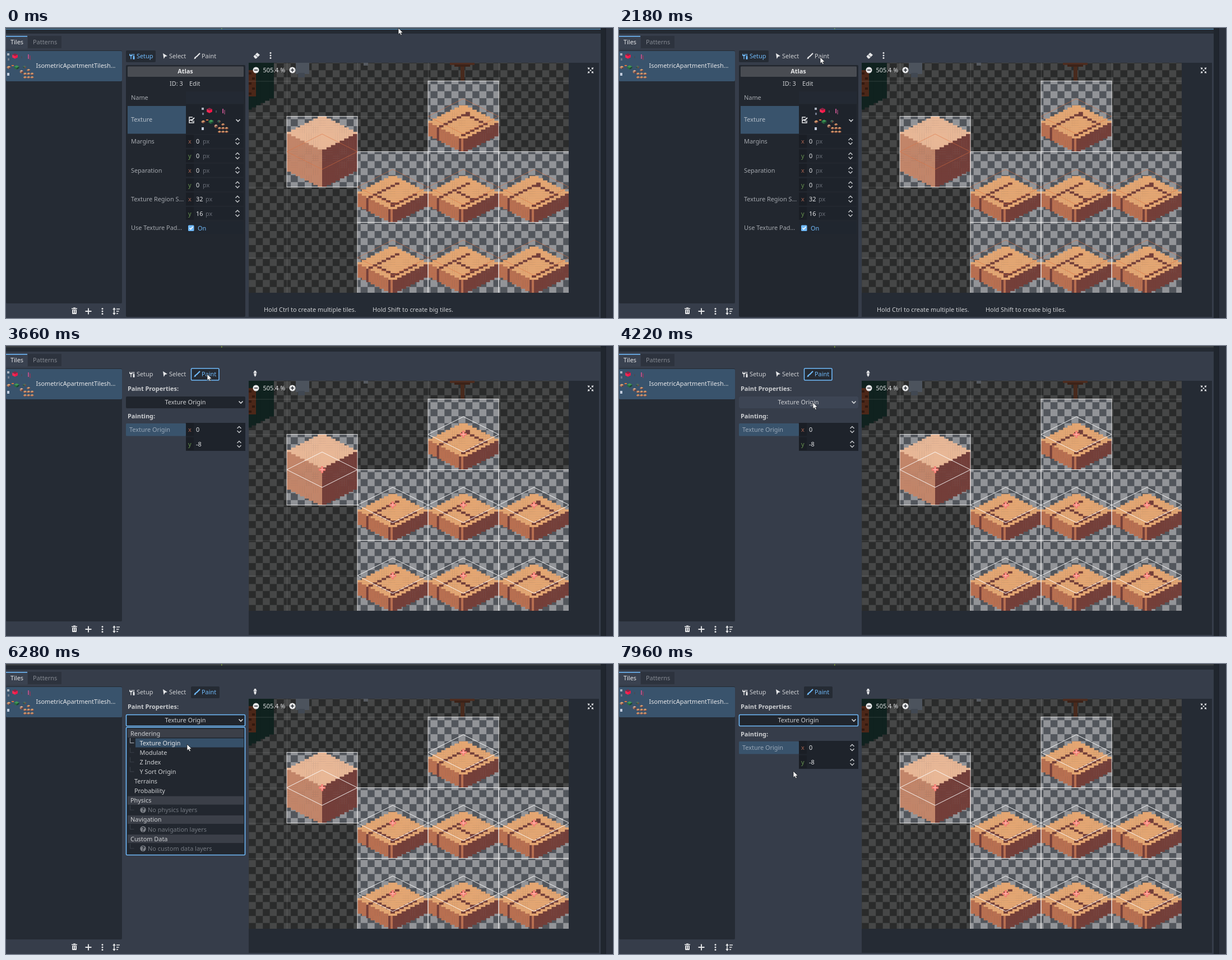
Animation of 1083 by 517 pixels, one loop 8 s. Source, as an HTML page with a canvas:

```html
<!DOCTYPE html>
<html lang="en">
<head>
<meta charset="utf-8">
<title>Tile set editor</title>
<style>
html, body { margin: 0; width: 100%; height: 100%; overflow: hidden; background: #363d4a; }
canvas, svg { position: absolute; left: 0; top: 0; }
svg text { font: 10.9px "Noto Sans", sans-serif; white-space: pre; }
svg .b { font-weight: 700; }
</style>
</head>
<body>
<canvas id="atlas" width="1083" height="517"></canvas>
<svg id="ui" width="1083" height="517" viewBox="0 0 1083 517"></svg>
<script>
const LOOP = 8000;
const BASE = '#363d4a', DARK = '#252b34', DEEP = '#1e232b', BLUE = '#70bafa', SEL = '#39536c';
const TEXT = '#cdcfd2', WHITE = '#e6e7e9';

// ---- atlas view (canvas) ----
const ctx = document.getElementById('atlas').getContext('2d');
const VIEW = { x: 433, y: 62, w: 571, h: 410 };
const TILE = 126, PX = TILE / 32, X0 = 501, Y0 = 94.5;
const CELL = TILE * 16 / 161.73;
const ORIGIN = { x: X0 - 4 * TILE, y: Y0 - 5 * TILE };
const BOX = { x: X0, y: 157.5 };
const CRATES = [[2, 0, 3], [1, 1, 12], [2, 1, 8], [3, 1, 3], [1, 2, 12], [2, 2, 8], [3, 2, 3]]
  .map(([c, r, seam]) => ({ x: X0 + c * TILE, y: Y0 + r * TILE, seam }));
const TILES = [BOX, ...CRATES];

function fill(x, y, w, h, color) {
  ctx.fillStyle = color;
  ctx.fillRect(x, y, w, h);
}

function checker(x, y, w, h, dark, light) {
  ctx.save();
  ctx.beginPath();
  ctx.rect(x, y, w, h);
  ctx.clip();
  fill(x, y, w, h, dark);
  const i0 = Math.floor((x - ORIGIN.x) / CELL), j0 = Math.floor((y - ORIGIN.y) / CELL);
  for (let j = j0; ORIGIN.y + j * CELL < y + h; j++)
    for (let i = i0; ORIGIN.x + i * CELL < x + w; i++)
      if ((i + j) % 2 === 0) fill(ORIGIN.x + i * CELL, ORIGIN.y + j * CELL, CELL, CELL, light);
  ctx.restore();
}

// Isometric block made of texels: a rhombus top plus two sides.
function block(o, top, thick, colors, shade) {
  for (let c = 0; c < 32; c++) {
    const k = Math.floor((c < 16 ? c : 31 - c) / 2);
    for (let r = top - k - 1; r < top + k + thick + 1; r++) {
      const face = r < top + k ? 0 : c < 16 ? 1 : 2;
      const color = shade && shade(c, r, face) || colors[face];
      fill(o.x + c * PX, o.y + r * PX, PX + .3, PX + .3, color);
    }
  }
}

function crate(o) {
  const seamColor = '#743f39';
  block(o, 19, 5, ['#e4a672', '#b86f50', seamColor], (c, r, face) => {
    if (face === 1) return (c === 4 || c === 14) && seamColor;
    if (face === 2) return false;
    const x = (c - 15.5) / 2, y = r - 10.75;
    const u = Math.floor(y + x), v = Math.floor(y - x);
    const plank = (u === 4 || u === 13) && v > 1 && v < 15;
    const cross = v === o.seam && u > 4 && u < 13;
    return (plank || cross) && seamColor;
  });
}

function dimArt() {
  for (let i = 0; i < 11; i++)
    fill(433, 62, 45 - Math.max(0, i - 5) * 7.9, 44 + i * 3.95, '#10221f');
  fill(433, 75, 13, 47, '#4c2718');
  for (let i = 0; i < 5; i++) fill(433 + i % 2 * 6, 79 + i * 9, 5, 4, '#32190f');
  fill(517, 62, 24, 20, '#4c535d');
  fill(521, 80, 12, 8, '#414852');
  fill(638, 62, 8, 5, '#565a60');
  fill(792, 62, 44, 4, '#4d2d20');
  fill(800, 65, 28, 4, '#3c2218');
  fill(811, 69, 7, 26, '#482a1d');
}

function drawAtlas(painting) {
  ctx.clearRect(0, 0, 1083, 517);
  fill(433, 62, 625, 453, DARK);
  ctx.save();
  ctx.beginPath();
  ctx.rect(VIEW.x, VIEW.y, VIEW.w, VIEW.h);
  ctx.clip();
  checker(VIEW.x, VIEW.y, VIEW.w, VIEW.h, '#2a2b2b', '#464747');
  dimArt();
  for (let i = 0; i < 4; i++) fill(X0 + i * TILE, VIEW.y, 1, VIEW.h, 'rgba(255,255,255,.13)');
  for (let i = 0; i < 6; i++) fill(VIEW.x, Y0 + i * TILE / 2, VIEW.w, 1, 'rgba(255,255,255,.13)');
  for (const t of TILES) checker(t.x, t.y, TILE, TILE, '#52565c', '#929498');
  block(BOX, 8, 16, ['#e8b796', '#c28569', '#733e39']);
  CRATES.forEach(crate);
  ctx.strokeStyle = 'rgba(245,245,245,.85)';
  for (const t of TILES) ctx.strokeRect(t.x, t.y, TILE, TILE);
  for (const t of TILES) {
    const x = t.x + 63, y = t.y + 63;
    ctx.strokeStyle = painting ? 'rgba(255,255,255,.9)' : 'rgba(222,112,62,.55)';
    ctx.beginPath();
    [[0, -31.5], [63, 0], [0, 31.5], [-63, 0]].forEach(([dx, dy]) => ctx.lineTo(x + dx, y + dy));
    ctx.closePath();
    ctx.stroke();
    if (painting) {
      fill(x - 6, y - 2, 12, 4, '#f47a70');
      fill(x - 2, y - 6, 4, 12, '#f47a70');
      fill(x - 4, y - .5, 8, 1, '#ffc2b8');
      fill(x - .5, y - 4, 1, 8, '#ffc2b8');
    }
  }
  ctx.restore();
}

// ---- interface (SVG) ----
const rect = (x, y, w, h, color, more = '') =>
  `<rect x="${x}" y="${y}" width="${w}" height="${h}" fill="${color}" ${more}/>`;
// y is the middle of the line
const text = (x, y, s, color = TEXT, more = '') =>
  `<text x="${x}" y="${y + 4}" fill="${color}" ${more}>${s}</text>`;
const line = (d, color = WHITE, w = 1.5) =>
  `<path d="${d}" fill="none" stroke="${color}" stroke-width="${w}"/>`;
const shape = (d, color = WHITE) => `<path d="${d}" fill="${color}"/>`;
const dot = (x, y, r, color = WHITE) => `<circle cx="${x}" cy="${y}" r="${r}" fill="${color}"/>`;
const group = (id, ...parts) => `<g id="${id}">${parts.join('')}</g>`;
const ring = (x, y, w, h) => rect(x, y, w, h, 'none', `stroke="${BLUE}" stroke-width="1.6" rx="1.5"`);
const middle = 'text-anchor="middle"', bold = 'class="b"';
const dots = (x, y) => [-4.5, 0, 4.5].map(d => dot(x, y + d, 1.5)).join('');
const spin = (x, y) => line(`M${x - 3.5} ${y - 2}l3.5 -3.5l3.5 3.5M${x - 3.5} ${y + 2}l3.5 3.5l3.5 -3.5`, '#c4c7cb', 1.5);
const chevron = (x, y) => line(`M${x - 3.5} ${y - 2}l3.5 3.5l3.5 -3.5`, '#d5d7da', 1.7);

function thumb(x, y) {
  const hex = (cx, cy, s, h, a, b, c) =>
    shape(`M${cx} ${cy - s}l${s} ${s / 2}l${-s} ${s / 2}l${-s} ${-s / 2}z`, a) +
    shape(`M${cx - s} ${cy - s / 2}l${s} ${s / 2}v${h}l${-s} ${-s / 2}z`, b) +
    shape(`M${cx + s} ${cy - s / 2}l${-s} ${s / 2}v${h}l${s} ${-s / 2}z`, c);
  let s = hex(16, 8, 4.8, 4.8, '#8b2444', '#f02a55', '#ff1648');
  for (let i = 0; i < 3; i++) for (let j = 0; j < 2; j++)
    s += hex(34 + i * 6.3, 40.500 + j * 6.4, 3, 1.4, '#e4a672', '#b86f50', '#9a523f');
  s += hex(40.300, 34, 3, 1.4, '#e4a672', '#b86f50', '#743f39');
  s += hex(27.700, 36, 3, 3, '#e8b796', '#b07b62', '#733e39');
  s += hex(5, 29, 3.500, 2, '#e4a672', '#b07b62', '#733e39');
  s += hex(19, 29, 4.500, 3, '#3f9a55', '#2a6b40', '#1d4a33');
  s += hex(33, 28, 3, 2, '#507060', '#2b5548', '#7a4a3c');
  s += rect(2, 3, 4, 4, '#a9b0bb') + rect(3, 12, 3, 4, '#70798a') + rect(2, 38, 4, 5, '#c0cbdc');
  s += rect(39, 5, 2, 8, '#b55088') + rect(42, 7, 2, 8, '#76405f') + rect(27, 8, 2, 4, '#444b57');
  s += rect(10, 24, 4, 2, '#d77643');
  return `<g transform="translate(${x} ${y})">${s}</g>`;
}

// Four arrows pointing at a centre dot.
const recenter = (x, y) => dot(x, y, 1.3) + [0, 90, 180, 270].map(a =>
  `<g transform="translate(${x} ${y}) rotate(${a})">${line('M5 5L2.800 2.800M2.500 5V2.500H5', WHITE, 1.2)}</g>`).join('');
const wrench = c => line('M221 46v3M225 46v3M223 49.5v6M228 46v5', c, 1.4) + rect(226.5, 50, 3, 6, c, 'rx="1"') + rect(220.5, 48, 5, 2, c);
const brush = c => line('M346 45l-6.5 6.5', c, 2.2) + shape('M340 51l-1.5 3.5l-3.2 1q1 -4 3.2 -5z', c);
const field = (y, axis, value) =>
  rect(321, y - 11.5, 103, 23, DEEP) + rect(321, y - 11.5, 14, 23, '#1a1e25') +
  text(325, y, axis, axis === 'x' ? '#a3614f' : '#66934f') + text(339, y, value, WHITE);
const sized = (y, axis, value) =>
  field(y, axis, value) + text(value.length > 1 ? 356 : 351, y, 'px', '#686d76') + spin(413, y);

const frame = [
  rect(0, 0, 1061, 10, '#242a33'), rect(0, 0, 1061, 2.5, '#3c4043'), rect(384, 0, 1.5, 3, '#6f8f35'),
  rect(1061, 0, 8, 517, '#20262e'), rect(1069, 0, 14, 517, '#2b313c'), rect(1069, 0, 1.5, 517, '#1c2129'),
  rect(0, 14, 38, 23, '#3a4250'), rect(0, 14, 38, 1.6, BLUE), rect(39, 14, 60, 22, '#2d333e'),
  text(8, 25, 'Tiles', WHITE), text(48, 25, 'Patterns', '#868b93'),
  rect(0, 40, 207, 451, DARK, 'rx="2"'), rect(0, 41, 207, 54, SEL, 'rx="2"'),
  thumb(0, 42), text(53.5, 67, 'IsometricApartmentTilesh...', WHITE),
  rect(118, 502, 8, 8, WHITE, 'rx="1"'), rect(117, 499.5, 10, 1.6, WHITE), rect(120, 498.3, 4, 1.5, WHITE),
  line('M120.5 503v5M123.5 503v5', BASE, 1),
  line('M147 499.5v11M141.5 505h11', WHITE, 1.9), dots(172, 505),
  line('M193 500v10M191 502l2 -2.5l2 2.5M191 508l2 2.5l2 -2.5M197 501h6M197 505h4.5M197 509h3'),
  shape('M280 45l8 5l-4 1l-2.5 4z'), text(291, 50, 'Select'),
  dot(446, 75, 5.5), line('M443 75h6', '#30343a', 1.6),
  dot(511, 75, 5.5), line('M508 75h6M511 72v6', '#30343a', 1.6),
  text(458.5, 75, '505.4 %', WHITE), recenter(1043, 75.5)
].join('');

const setup = group('setup',
  rect(0, 1.5, 1061, 1.3, '#4f8dbd'),
  rect(214, 40, 53, 21, DARK, 'rx="2"'), wrench(BLUE), text(233, 50, 'Setup', BLUE),
  brush(WHITE), text(349, 50, 'Paint'),
  shape('M441.5 50.5l6.5 -6.5l5 4l-6.5 6.5h-2z'), line('M444.5 47.5l5 4.5', BASE, 1), dots(472, 49),
  rect(214, 66, 213, 449, '#22272f', 'rx="2"'), rect(217, 68.5, 207, 18.5, '#494c52', 'rx="1.5"'),
  text(320, 77, 'Atlas', WHITE, bold + middle), text(292, 98.5, 'ID: 3'), text(327, 98.5, 'Edit'),
  text(223, 123.5, 'Name', '#a4a8ae'), rect(321, 113, 103, 22, '#232933'),
  rect(217, 139, 104, 49.5, SEL), text(223, 163, 'Texture', '#b6bfc9'),
  rect(321, 136, 103, 53, DEEP), thumb(347, 139), chevron(414, 165),
  line('M333 159h-6v10h8v-4M327 166l3 -3l3 4', WHITE, 1.4), line('M336 160l-5 5', WHITE, 2),
  text(223, 202, 'Margins', '#a4a8ae'), sized(202, 'x', '0'), sized(228, 'y', '0'),
  text(223, 253.5, 'Separation', '#a4a8ae'), sized(253.5, 'x', '0'), sized(279.5, 'y', '0'),
  text(223, 305, 'Texture Region S...', '#a4a8ae'), sized(305, 'x', '32'), sized(330.5, 'y', '16'),
  text(223, 356, 'Use Texture Pad...', '#a4a8ae'), rect(321, 345, 103, 22, '#20262f'),
  rect(325, 351.5, 10.5, 10.5, BLUE, 'rx="1.5"'), line('M327.5 356.5l2 2.3l4 -4.6', '#fff', 1.5),
  text(342, 356.5, 'On', BLUE),
  text(460, 501.5, 'Hold Ctrl to create multiple tiles.'), text(654, 501.5, 'Hold Shift to create big tiles.')
);

const paint = group('paint',
  wrench(WHITE), text(233, 50, 'Setup'),
  rect(330, 40, 51, 21, DARK, 'rx="2"'), brush(BLUE), text(349, 50, 'Paint', BLUE),
  group('paintRing', ring(330.5, 40, 49.5, 21)),
  rect(442.5, 44, 4, 4, WHITE, 'rx="1.5"'), rect(441.5, 47, 6, 1.5, WHITE), shape('M442.5 49h4v3l-2 3l-2 -3z'),
  text(217, 75.5, 'Paint Properties:', TEXT, bold),
  rect(214, 90, 213, 21, '#20252d', 'rx="2"'), group('hover', rect(214, 90, 213, 21, '#3d4554', 'rx="2"')),
  text(320, 100, 'Texture Origin', TEXT, middle), chevron(419, 100.5),
  group('dropRing', ring(214.5, 90.5, 212, 20)),
  text(217, 125, 'Painting:', TEXT, bold),
  rect(214, 138, 107, 22.5, SEL, 'rx="1.5"'), text(220, 148.5, 'Texture Origin', '#99a7b6'),
  rect(321, 137, 106, 50, DEEP), field(148.5, 'x', '0'), field(174.5, 'y', '-8'), spin(416, 149), spin(416, 175)
);

const rows = [
  ['head', 'Rendering'], ['leaf', 'Texture Origin'], ['leaf', 'Modulate'], ['leaf', 'Z Index'],
  ['leaf', 'Y Sort Origin'], ['item', 'Terrains'], ['item', 'Probability'],
  ['head', 'Physics'], ['none', 'No physics layers'], ['head', 'Navigation'],
  ['none', 'No navigation layers'], ['head', 'Custom Data'], ['none', 'No custom data layers']
];
const popup = group('popup',
  rect(214, 112, 213, 229, '#22272f', 'rx="2"'),
  rows.map(([kind, label], i) => {
    const y = 123.5 + i * 17.1;
    const branch = line(`M221.5 ${y - 8.5}v8.5h7`, i === 1 ? '#9ba0a8' : '#393f48', 1.1);
    if (kind === 'head') return rect(217, y - 7.5, 207, 15, '#3b3f48') + text(222, y, label);
    if (kind === 'item') return text(229, y, label);
    if (kind === 'none')
      return branch + dot(244.5, y, 5.2, '#7b7f86') +
        text(244.5, y, '?', '#22272f', bold + middle) + text(253, y, label, '#757a82');
    return (i === 1 ? rect(231, y - 8, 193, 16, '#365069') : '') + branch + text(238.5, y, label, i === 1 ? WHITE : TEXT);
  }).join(''),
  group('popupRing', ring(214.5, 113, 212, 227.5))
);

const cursor = group('cursor',
  '<path d="M0 0V11.4L2.6 9L4.4 13L6.4 12.1L4.7 8.3H8.3Z" fill="#fff" stroke="#1a1d22" stroke-width=".8"/>');

document.getElementById('ui').innerHTML = frame + setup + paint + popup + cursor;

// ---- timeline ----
// time, x, y of the pointer tip
const path = [
  [0, 700, 0], [370, 700, 0], [420, 505, 3], [460, 440, -20], [780, 690, -20], [860, 640, 4],
  [1340, 275, 17], [1460, 190, 45], [1580, 208, 74], [1640, 214, 72], [1800, 240, 45], [2000, 320, 40],
  [2180, 359, 52], [2550, 359, 52], [2700, 398, 42], [2850, 340, 74], [3000, 282, 48], [3080, 295, 22],
  [3180, 323, 45], [3300, 335, 50], [3360, 342, 50], [3480, 359, 50], [3820, 359, 50], [4000, 352, 75],
  [4200, 346, 100], [4340, 346, 105], [4580, 346, 105], [4800, 338, 125], [5100, 318, 143],
  [5370, 300, 143], [5600, 256, 138], [5850, 323, 143], [6590, 323, 143], [6750, 325, 260],
  [6950, 300, 395], [7200, 290, 330], [7360, 300, 250], [7420, 300, 245], [7650, 355, 132],
  [7800, 330, 150], [7960, 311, 191], [LOOP, 311, 191]
];
// part: visible from, to
const shown = {
  setup: [0, 3650], paint: [3650, LOOP], paintRing: [3650, 4330], hover: [4100, 4700],
  dropRing: [4330, LOOP], popup: [4330, 6620], popupRing: [6280, 6620]
};
const parts = Object.entries(shown).map(([id, span]) => [document.getElementById(id), ...span]);
const pointer = document.getElementById('cursor');
let mode = null;

function render(now) {
  const t = now % LOOP;
  for (const [el, from, to] of parts) el.style.display = t >= from && t < to ? '' : 'none';
  const painting = t >= shown.paint[0];
  if (painting !== mode) drawAtlas(mode = painting);
  const i = path.findIndex(p => p[0] > t);
  const [t0, x0, y0] = path[i - 1], [t1, x1, y1] = path[i];
  const k = (t - t0) / (t1 - t0);
  pointer.setAttribute('transform', `translate(${x0 + (x1 - x0) * k} ${y0 + (y1 - y0) * k})`);
}

const start = performance.now();
function tick() {
  render(performance.now() - start);
  requestAnimationFrame(tick);
}
tick();
</script>
</body>
</html>
```
